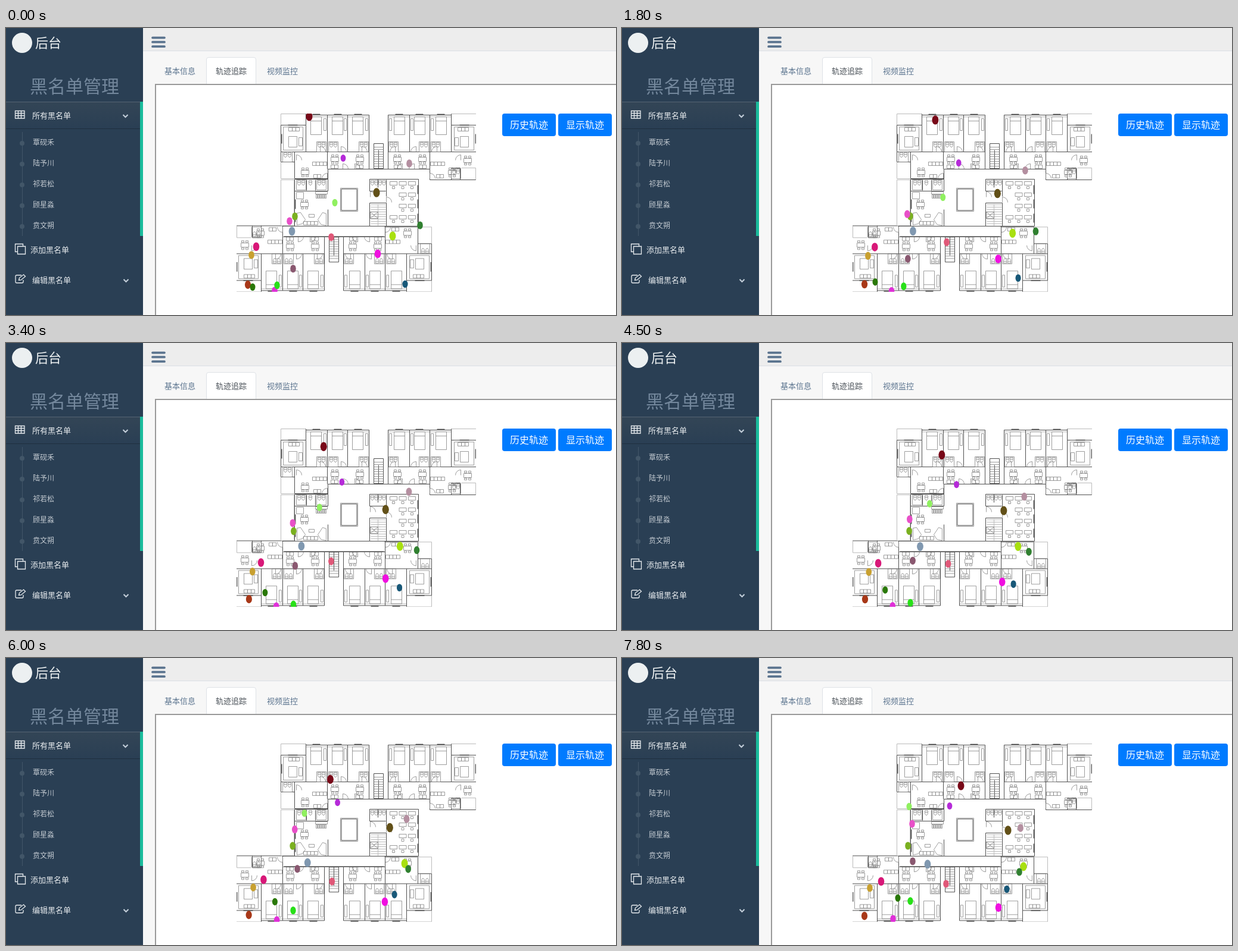
An HTML page for the animation above (8 s loop, 1024 by 483 pixels).

```html
<!DOCTYPE html>
<html lang="zh-CN">
<head>
<meta charset="utf-8">
<title>后台</title>
<style>
  html, body { margin: 0; width: 100%; height: 100%; overflow: hidden; background: #f7f7f7; }
  svg { display: block; width: 1024px; height: 483px; }
  text { font-family: "Noto Sans CJK SC", "Noto Sans CJK", "Open Sans", sans-serif; font-size: 13px; fill: #5a738e; }
  .menu { fill: #e7ebee; font-weight: 500; }
  .sub { fill: #c4cbd2; font-size: 12px; }
  .btn { fill: #fff; font-size: 16px; }
  .icon { fill: none; stroke: #e7ebee; stroke-width: 1.3; }
  .chevron { fill: none; stroke: #c4cfda; stroke-width: 2; }
  .plan path { fill: none; }
  .wall { stroke: #505050; stroke-width: 1; }
  .thin { stroke: #bbb; stroke-width: 1; }
  .item { stroke: #858585; stroke-width: .8; }
  .pane { stroke: #666; stroke-width: 2; }
</style>
</head>
<body>
<svg viewBox="0 0 1024 483">
  <defs>
    <linearGradient id="active" x2="0" y2="1">
      <stop offset="0" stop-color="#334556"/>
      <stop offset="1" stop-color="#2a3f54"/>
    </linearGradient>
    <clipPath id="area"><rect x="387" y="144" width="402" height="300"/></clipPath>
  </defs>

  <rect width="1024" height="483" fill="#f7f7f7"/>
  <rect x="230" width="794" height="38" fill="#ededed"/>
  <rect x="230" y="38" width="794" height="1" fill="#d9dee4"/>
  <path d="M246 16.300h20M246 23.700h20M246 31.200h20" stroke="#5a738e" stroke-width="3.700" stroke-linecap="round"/>

  <rect width="230" height="483" fill="#2a3f54"/>
  <circle cx="27" cy="25" r="17" fill="#ecf0f1"/>
  <text x="49" y="33" style="font-size:22px;fill:#ecf0f1">后台</text>
  <text x="40" y="109" style="font-size:30px;fill:#73879c;font-weight:300">黑名单管理</text>
  <rect y="124" width="225" height="45" fill="url(#active)"/>
  <rect y="124" width="225" height="1" fill="#556473"/>
  <rect y="169" width="225" height="1" fill="#1f2f3f"/>
  <rect x="225" y="124" width="5" height="226" fill="#1abb9c"/>
  <path class="icon" d="M15.500 139.500h15.500v12.500h-15.500zM15.500 143.500h15.500M15.500 147.500h15.500M20.500 140v12M25.500 140v12"/>
  <text class="menu" x="44" y="151.500">所有黑名单</text>
  <path class="chevron" d="M196.500 146l4 4 4-4"/>
  <path d="M27.500 175v175" stroke="#425668"/>
  <g id="people"></g>
  <path class="icon" d="M19.500 367.500h13v13h-13zM19 376.500h-3.500v-13h13v3.500"/>
  <text class="menu" x="41" y="377.500">添加黑名单</text>
  <path class="icon" d="M26 416h-8q-2 0-2 2v9q0 2 2 2h9q2 0 2-2v-3M21.500 424.500l1-4 7-5.500 3 3-7 6z"/>
  <text class="menu" x="44" y="428.500">编辑黑名单</text>
  <path class="chevron" d="M197.500 423l4 4 4-4"/>

  <rect x="251" y="95" width="790" height="420" fill="#fff" stroke="#999" stroke-width="2"/>
  <path d="M336.500 94v-41q0-3.500 3.500-3.500h76q3.500 0 3.500 3.500v41" fill="#fff" stroke="#dee2e6"/>
  <text x="266" y="77">基本信息</text>
  <text x="352" y="77" style="fill:#495057">轨迹追踪</text>
  <text x="438" y="77">视频监控</text>
  <rect x="833" y="144" width="90" height="38" rx="4" fill="#007bff"/>
  <rect x="927" y="144" width="90" height="38" rx="4" fill="#007bff"/>
  <text class="btn" x="846" y="169">历史轨迹</text>
  <text class="btn" x="940" y="169">显示轨迹</text>

  <g clip-path="url(#area)">
    <g id="plan" class="plan" transform="translate(.5 .5)"></g>
    <g id="dots"></g>
  </g>
</svg>

<script>
const byId = id => document.getElementById(id);

byId('people').innerHTML = ['覃砚禾', '陆予川', '祁若松', '顾星淼', '贲文朔'].map((name, i) => `
  <circle cx="27" cy="${194 + 35 * i}" r="4" fill="#425668"/>
  <text class="sub" x="45" y="${197 + 35 * i}">${name}</text>`).join('');

// Floor plan pieces, each returning path data
const path = (kind, d) => `<path class="${kind}" d="${d}"/>`;
const box = (x, y, w, h) => `M${x} ${y}h${w}v${h}h${-w}z`;
const row = (n, piece) => Array.from({ length: n }, (_, i) => piece(i)).join('');
const door = (x, y, dx, dy) =>
  `M${x} ${y}v${dy}A9 9 0 0 ${dx * dy < 0 ? 1 : 0} ${x + dx} ${y}`;
const bed = (x, y) => box(x, y, 18, 30) + `M${x} ${y + 7}h18`;
const wc = (x, y) => box(x, y, 5, 3) + `M${x} ${y + 3}q0 5 2.500 5t2.500-5`;
const table = (x, y) => box(x, y, 13, 7) + row(4, i => box(x + 1 + i % 2 * 7, y - 4 + (i >> 1) * 12, 4, 3));
const desk = (x, y) => box(x, y, 12, 6) + box(x + 4, y + 8, 4, 4);
const sofa = (x, y, n) => row(n, i => box(x + i * 6, y, 6, 6));
const bath = (x, y) => box(x, y, 16, 17) + wc(x + 2, y + 1) + wc(x + 9, y + 1);

function bedroom(x, width, bathX) {
  return path('wall', `M${x + width} 146v62M${x} 208h${width}`) +
    path('pane', `M${x + 11} 145h13`) +
    path('item', bed(x + 8, 149) + box(x + width - 6, 152, 4, 20) + bath(bathX, 191) +
      door(x + width / 2 + 6, 208, 9, -9));
}

// One flat of the wing: study, three bedrooms and living space
const flat =
  path('thin', 'M461 163v-19h42M503 149h106') +
  path('wall', 'M461 163h42v-19M461 163v45h42v-45M503 146h106M609 146v91M539 208v29M541 237h68') +
  path('pane', 'M473 163h16M462 178v16') +
  bedroom(503, 36, 521) + bedroom(539, 34, 541) + bedroom(573, 36, 592) +
  path('item', box(465, 166, 33, 39) + box(474, 182, 14, 18) + sofa(474, 167, 3) + box(491, 184, 6, 14) +
    row(2, i => table(545 + i * 42, 217) + sofa(545 + i * 42, 230, 2) + door(565 + i * 20, 237, 9, -9)) +
    table(495, 239) + sofa(514, 225, 4) + sofa(516, 246, 2) + door(487, 222, 9, -9) + door(539, 253, -9, -9));

const leftEnd =
  path('wall', 'M461 208v17h23M484 208v45h56') +
  path('thin', 'M461 225v28h23') +
  path('item', bath(464, 208));

const rightEnd =
  path('wall', 'M711 237v18h78v-47M747 235h15v20M747 235v20') +
  path('thin', 'M764 235h24v20') +
  path('item', bath(747, 236) + table(768, 219));

const stairs =
  path('wall', box(617, 194, 16, 42) + 'M625 205v31M609 237h32') +
  path('item', row(9, i => `M617 ${200 + i * 4}h16`));

const wing = `${flat}${leftEnd}${rightEnd}${stairs}
  <g transform="matrix(-1 0 0 1 1250 0)">${flat}</g>`;

const kitchen =
  path('thin', box(461, 255, 22, 77)) +
  path('wall', 'M484 254h56v20h-56M484 254v79M504 255v18M519 255v18M540 305v28M464 333h76') +
  path('pane', 'M485 288v16M485 312v14') +
  path('item', bath(487, 255) + bath(521, 255) + wc(508, 256) +
    box(519, 275, 20, 4) + row(6, i => box(520 + i * 3, 280, 2, 6)) +
    box(487, 276, 12, 11) + table(494, 293) + sofa(499, 325, 4) + box(508, 313, 9, 5) +
    'M488 311l6-1 8 12-5 7-9 2zM537 312l-6-2-8 12 5 8 9 2z');

const office =
  path('wall', 'M610 254h82v79h-82v-39h28v39M610 254v20h27M638 255v28M624 254v14') +
  path('pane', row(3, i => `M691 ${264 + i * 24}v15`)) +
  path('thin', row(9, i => `M612 ${297 + i * 4}h25`) + 'M624 296v36') +
  path('item', row(4, i => wc(612 + i * 6.500, 256)) + box(611, 309, 13, 11) + 'M611 309l13 11M624 309l-13 11' +
    door(611, 284, 9, -9) + door(638, 293, 9, -9) +
    row(4, y => row(3, x => x || y % 3 === 0 ? desk(644 + x * 15.500, 258 + y * 19) : '')));

const hall =
  path('wall', 'M540 254v-17h171M636 333v18h-171M540 333h70') +
  path('item', box(561, 269, 29, 39)) + path('wall', box(562.5, 270.5, 26, 36));

byId('plan').innerHTML =
  wing + `<g transform="rotate(180 587.5 293.7)">${wing}</g>` + kitchen + office + hall;

// Tracked people: each route lists a few places, evenly spaced in time
const dots = [];

function dot(color, r, route) {
  const node = document.createElementNS('http://www.w3.org/2000/svg', 'ellipse');
  node.setAttribute('rx', r);
  node.setAttribute('ry', r * 1.38);
  node.setAttribute('fill', color);
  byId('dots').append(node);
  dots.push({ node, route: route.split(' ').map(p => p.split(',').map(Number)) });
}

dot('#780818', 5.5, '509,149 527,156 535,181 543,203 569,215');
dot('#b52ad8', 4.4, '566,219 563,236 550,249');
dot('#b48fa0', 4.9, '677,228 676,254 669,286');
dot('#625018', 5.6, '622,277 639,281 648,290');
dot('#90f060', 4.5, '552,294 522,274 482,250');
dot('#7ab020', 4.8, '485,317 480,316');
dot('#e850c8', 4.8, '476,325 482,300 487,279');
dot('#8098b0', 5.4, '480,342 498,342 513,347');
dot('#e05878', 4.8, '546,352 545,364 548,374 544,380');
dot('#d81878', 5.3, '420,368 429,370 435,376');
dot('#c8a030', 4.8, '412,382 414,385 416,387');
dot('#8a5870', 4.8, '482,405 480,387 487,371 489,356 488,342');
dot('#a83818', 5.1, '406,432 408,431 407,434');
dot('#e030d8', 4.8, '451,442 454,443 455,439');
dot('#2a7808', 4.5, '414,436 438,418 463,404');
dot('#28e018', 4.7, '455,433 474,435 484,440 482,426 484,409');
dot('#f010e0', 5.3, '624,380 638,399 632,420');
dot('#a8e010', 5.5, '649,350 663,342 674,351');
dot('#308030', 4.8, '695,332 693,346 679,353 667,360');
dot('#185878', 4.6, '670,431 659,409 646,389');

// Refreshes every 100 ms, stalls at 2.4 s, then goes on at a slower pace from 3.1 s
function held(ms) {
  const tenth = Math.floor(ms / 100), pace = 1.643;
  if (tenth < 31) return Math.min(tenth, 24);
  return Math.floor(31 + pace * (Math.ceil((tenth - 30) / pace) - 1));
}

// Smooth curve through a route, with u from 0 to 1
function along(route, axis, u) {
  const last = route.length - 1;
  const i = Math.min(Math.floor(u * last), last - 1);
  const f = u * last - i, g = 1 - f;
  const slope = k => {
    const a = Math.max(k - 1, 0), b = Math.min(k + 1, last);
    return (route[b][axis] - route[a][axis]) / (b - a);
  };
  return g * g * ((1 + 2 * f) * route[i][axis] + f * slope(i)) +
    f * f * ((1 + 2 * g) * route[i + 1][axis] - g * slope(i + 1));
}

function draw(ms) {
  const u = held(ms) / 78;
  for (const { node, route } of dots) {
    node.setAttribute('cx', along(route, 0, u));
    node.setAttribute('cy', along(route, 1, u));
  }
}

const start = performance.now();
function loop() {
  draw((performance.now() - start) % 8000);
  requestAnimationFrame(loop);
}
loop();
</script>
</body>
</html>
```
